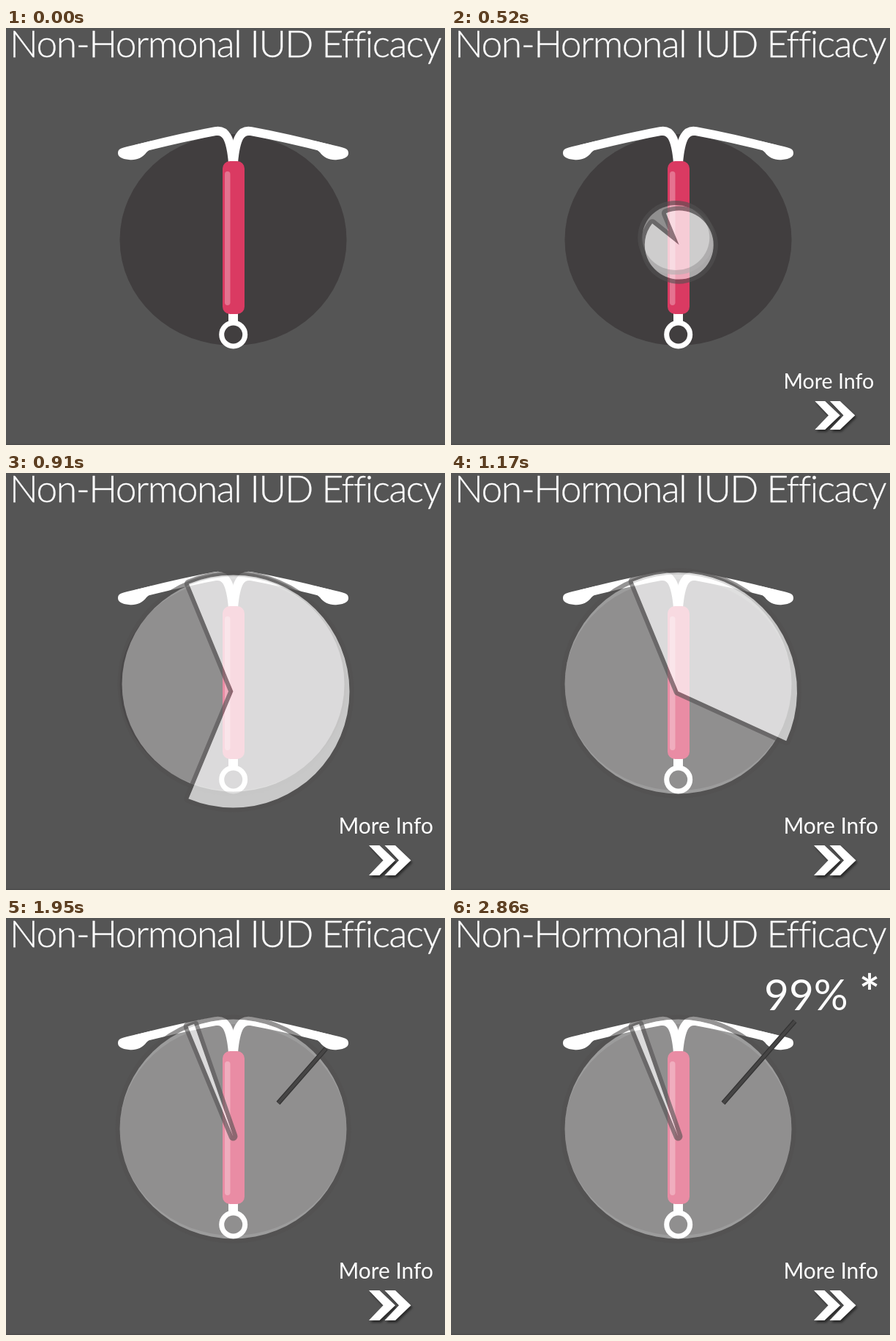
These frames come from a looping animation (600x570 px, 7.02 s). An HTML page with a canvas:

```html
<!DOCTYPE html>
<html lang="en">
<head>
<meta charset="utf-8">
<title>Non-Hormonal IUD Efficacy</title>
<style>
  html, body { margin: 0; width: 100%; height: 100%; overflow: hidden; background: #555; }
  svg, canvas { position: absolute; left: 0; top: 0; width: 600px; height: 570px; }
  text { font-family: Lato, "Open Sans", sans-serif; fill: #fff; }
  #title { letter-spacing: -1.5px; stroke: #fff; stroke-width: .3px; }
  #arrows { filter: drop-shadow(2px 3px 1.5px rgba(0, 0, 0, .5)); }
</style>
</head>
<body>
<svg viewBox="0 0 600 570">
  <defs>
    <g id="arm">
      <path d="M178 165.5 Q238 150 286 141.2 C300 138.5 307 150 310 184" fill="none" stroke="#fff" stroke-width="12"/>
      <path d="M153 171 C153 165 158 164 166 162 L198 154.5 V165 Q195 167 192 170 C186 178 178 181 168 180 C158 179 153 176 153 171Z" fill="#fff"/>
    </g>
    <path id="chev" d="M496 509 H510.5 L532 529.5 L510.5 550 H496 L515.5 529.5Z"/>
  </defs>
  <rect width="600" height="570" fill="#555"/>
  <rect y="568.5" width="600" height="1.5" fill="#4d4d4d"/>
  <ellipse cx="310.5" cy="289.5" rx="155" ry="144.5" fill="#413e3f"/>

  <use href="#arm"/>
  <use href="#arm" transform="matrix(-1 0 0 1 621 0)"/>
  <rect x="304" y="386" width="13" height="20" fill="#fff"/>
  <circle cx="310.7" cy="419" r="16" fill="none" stroke="#fff" stroke-width="7"/>
  <rect x="296" y="182" width="30" height="209" rx="10" fill="#da3a62"/>
  <rect x="299" y="196" width="7.5" height="183" rx="3.7" fill="#fff" fill-opacity=".29"/>

  <text id="title" x="299.5" y="40" font-size="51.5" font-weight="300" text-anchor="middle">Non-Hormonal IUD Efficacy</text>
  <g id="label"><text x="454.5" y="493" font-size="29.9">More Info</text></g>
  <g id="arrows" fill="#fff"><use href="#chev"/><use href="#chev" x="21.5"/></g>
  <text id="value" x="428" y="126" font-size="58.5">99%</text>
  <text id="star" x="572" y="126" font-size="66" font-weight="700" text-anchor="middle">*</text>
</svg>
<canvas id="pie" width="600" height="570"></canvas>
<script>
const STEP = 130, STEPS = 54;
const $ = id => document.getElementById(id);
const ctx = $('pie').getContext('2d');
const rad = deg => (deg - 90) * Math.PI / 180;
const at = (list, k) => list[Math.min(k, list.length - 1)];

// One value per step; the last one holds
const grow = [0, 1, 7, 21, 46, 87, 127, 152, 155];
const radius = [0, 1, 7, 21.5, 47, 91, 132.5, 159, 162.5];
const swept = [0, 0, 3, 12, 29, 58, 93, 135, 180, 223, 264, 301, 331.7, 349, 356.8];
const pop = [0, 0.12, 0.4, 0.7, 0.955, 1.045, 1];
const START = -22.4;

// Translucent fill with a stroke only on the outside of the shape
function shape(path, alpha) {
  const outside = new Path2D();
  outside.rect(0, 0, 600, 570);
  outside.addPath(path);
  ctx.save();
  ctx.clip(outside, 'evenodd');
  ctx.lineWidth = 12;
  ctx.lineJoin = 'round';
  ctx.strokeStyle = 'rgba(83,82,82,.62)';
  ctx.stroke(path);
  ctx.restore();
  ctx.fillStyle = `rgba(255,255,255,${alpha})`;
  ctx.fill(path);
}

// The two layers drift apart and the wedge fades in while they are small
function drawPie(k) {
  const rx = at(grow, k), r = at(radius, k);
  if (!rx) return;
  const q = Math.max(0, 1 - rx / 127);
  const disc = new Path2D();
  disc.ellipse(310.5 - 5 * q, 288.5 - 3 * q, rx, rx * 150 / 155, 0, 0, 7);
  shape(disc, 0.42);

  const x = 310.5 + 2 * q, y = 298.5 - 3 * q;
  const wedge = new Path2D();
  wedge.moveTo(x, y);
  wedge.arc(x, y, r, rad(START), rad(START + 360 - at(swept, k)));
  wedge.closePath();
  shape(wedge, 0.68 * Math.min(1, 0.5 + r / 150));
}

function drawPointer(part) {
  if (part <= 0) return;
  for (const [width, color] of [[6.5, '#343434'], [4, '#464545']]) {
    ctx.lineWidth = width;
    ctx.strokeStyle = color;
    ctx.beginPath();
    ctx.moveTo(372, 253);
    ctx.lineTo(372 + 98 * part, 253 - 112 * part);
    ctx.stroke();
  }
}

function scaleAt(id, x, y, s) {
  $(id).setAttribute('transform', `translate(${x} ${y}) scale(${s}) translate(${-x} ${-y})`);
}

function draw(k) {
  ctx.clearRect(0, 0, 600, 570);
  drawPie(k);
  drawPointer(Math.min(1, (k - 13) / 3));
  const s = at(pop, k);
  scaleAt('label', 455, 483, s);
  scaleAt('arrows', 525.5, 530, s);
  $('value').style.opacity = Math.max(0, Math.min(1, (k - 16) / 2));
  $('star').style.opacity = k >= 22 ? 1 : 0;
}

const begin = performance.now();
let shown = -1;
function tick() {
  const k = Math.floor((performance.now() - begin) / STEP) % STEPS;
  if (k !== shown) draw(shown = k);
  requestAnimationFrame(tick);
}
tick();
</script>
</body>
</html>
```
